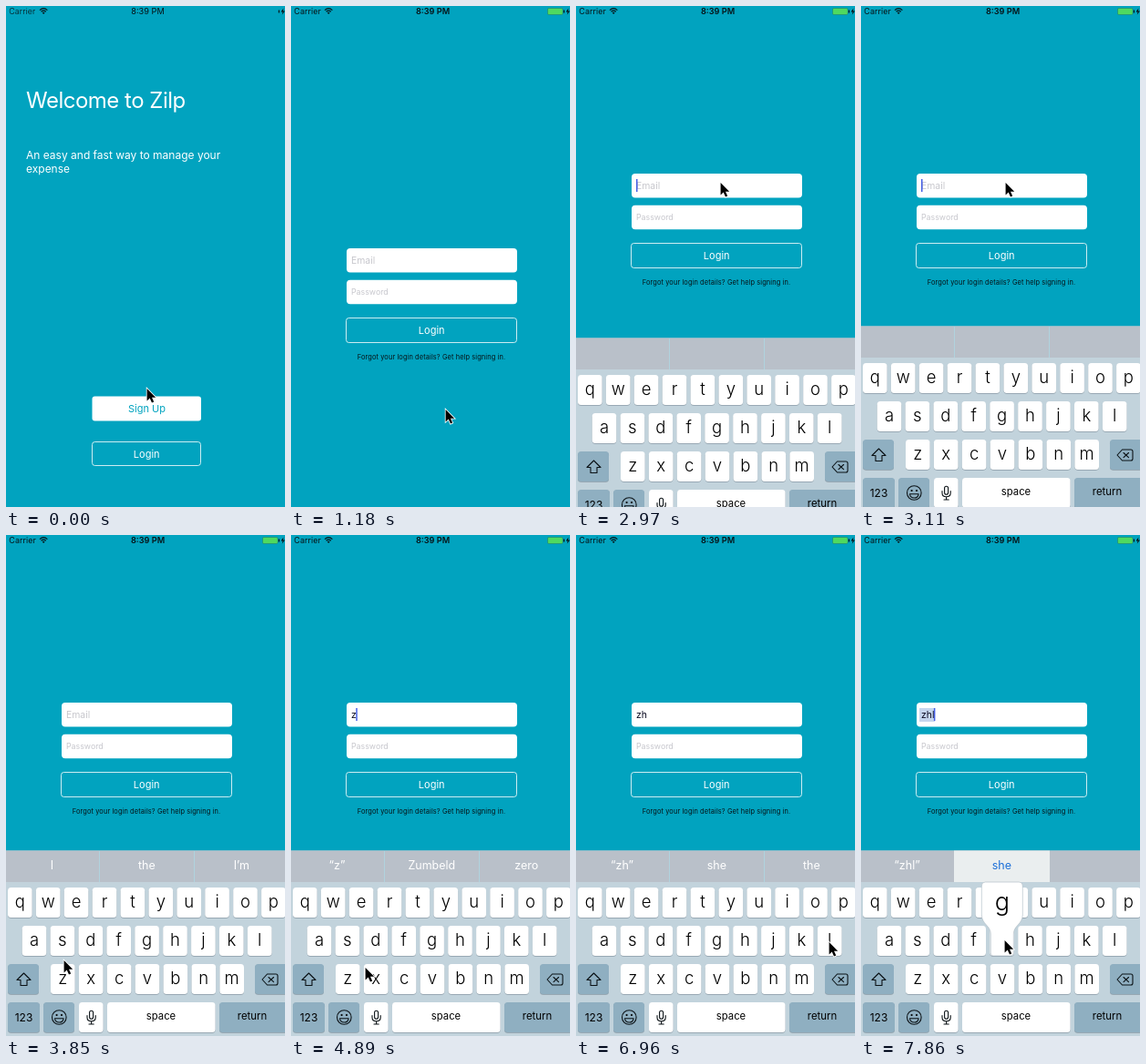
An HTML page for the animation above (8 s loop, 306 px wide and 550 px high).

```html
<!DOCTYPE html>
<html lang="en">
<head>
<meta charset="utf-8">
<title>Login flow</title>
<style>
  html, body { margin: 0; width: 100%; height: 100%; overflow: hidden; background: #01a3bf; }
  svg { display: block; font-family: Inter, "Open Sans", sans-serif; }
  text { white-space: pre; }
</style>
</head>
<body>
<svg id="stage" width="306" height="550" viewBox="0 0 306 550"></svg>
<script>
const LOOP = 8000, STEP = 148.3, LAST = 53;
const TEAL = '#01a3bf', INK = '#071418', PALE = '#c7c7cd';

const rect = (x, y, w, h, fill, more = '') =>
  `<rect x="${x}" y="${y}" width="${w}" height="${h}" fill="${fill}" ${more}/>`;
const text = (x, y, size, str, fill = '#fff', more = '') =>
  `<text x="${x}" y="${y}" font-size="${size}" fill="${fill}" ${more}>${str}</text>`;
const mid = (x, y, size, str, fill, more = '') =>
  text(x, y, size, str, fill, 'text-anchor="middle" ' + more);
const path = (d, more = '') => `<path d="${d}" ${more}/>`;
const group = (id, body) => `<g id="${id}">${body}</g>`;
const outline = (x, y, w, h) =>
  rect(x, y, w, h, 'none', 'rx="3" stroke="#fff" stroke-opacity=".8"');

// Keyboard geometry
const PITCH = 30.9, KEY_W = 26.6, KEY_H = 33;
const ROWS = [['qwertyuiop', 2, 387], ['asdfghjkl', 17.7, 429], ['zxcvbnm', 49, 471]];
const keys = {};
for (const [letters, x, y] of ROWS)
  [...letters].forEach((c, i) => keys[c] = { x: x + i * PITCH, y });

const keyCap = (x, y, w, fill = '#fff') =>
  rect(x, y + .8, w, KEY_H, '#8b9ba6', 'rx="3.5"') + rect(x, y, w, KEY_H, fill, 'rx="3.5"');
const letterKey = ([c, k]) =>
  keyCap(k.x, k.y, KEY_W) + mid(k.x + KEY_W / 2, k.y + 21.5, 18.5, c, '#000', 'font-weight="300"');

function keyboard() {
  const line = 'fill="none" stroke="#0b1216" stroke-width="1.1" stroke-linejoin="round" stroke-linecap="round"';
  const dark = '#8fafc1';
  return rect(0, 346.5, 306, 240, '#c2d3dc') + rect(0, 346.5, 306, 34.5, '#b9c0c9') +
    rect(102, 347, 1, 34, '#b0d3de') + rect(206, 347, 1, 34, '#b0d3de') +
    group('hints', '') +
    Object.entries(keys).map(letterKey).join('') +
    keyCap(2, 471, 34, dark) + keyCap(273, 471, 36, dark) +
    keyCap(2, 513, 35, dark) + keyCap(41, 513, 34, dark) +
    keyCap(80, 513, 26.6) + keyCap(111, 513, 118.6) + keyCap(234, 513, 75, dark) +
    path('M19.5 481L27 488.5H23V494.5H16V488.5H12Z', line) +
    path('M286.5 482H296Q298 482 298 484V492Q298 494 296 494H286.5L281 488ZM288 485.5L293.5 490.7M293.5 485.5L288 490.7', line) +
    mid(19.5, 533.5, 12, '123', '#000') +
    `<circle cx="58.3" cy="529.5" r="7.8" ${line}/>` +
    path('M53.5 530.8H63.1Q62.5 535 58.3 535Q54 535 53.5 530.8Z', line) +
    '<circle cx="55.6" cy="527" r="1.1"/><circle cx="61" cy="527" r="1.1"/>' +
    `<rect x="91.6" y="522.3" width="4" height="9" rx="2" ${line}/>` +
    path('M89 527.5V529.5Q89 533.8 93.6 533.8Q98.2 533.8 98.2 529.5V527.5M93.6 534V537M91 537H96.2', line) +
    mid(170, 532, 11.3, 'space', '#000') + mid(270, 532, 11.4, 'return', '#000');
}

const welcome =
  text(22, 112, 24, 'Welcome to Zilp', '#fff', 'letter-spacing="-.5"') +
  text(22, 168, 12, 'An easy and fast way to manage your') +
  text(22, 183, 12, 'expense') +
  rect(94.5, 428.5, 119.5, 27, '#fff', 'rx="3"') + mid(154.5, 446, 11, 'Sign Up', TEAL) +
  outline(94.5, 478.5, 119, 26) + mid(154.2, 495.5, 11, 'Login', '#fff', 'id="enter"');

const login =
  rect(0, 0, 306, 550, TEAL) +
  rect(61, 184, 187, 26.5, '#fff', 'rx="4"') + rect(61, 218.8, 187, 26.5, '#fff', 'rx="4"') +
  rect(64, 190, 17, 15, '#c6d6ee', 'id="mark"') +
  text(66, 201, 10.4, 'Email', PALE, 'id="hold"') +
  text(66, 201, 10.4, '', '#0a0a20', 'id="typed"') +
  rect(66, 190, 1.5, 14, '#4660e6', 'id="caret"') +
  text(66, 234.5, 8.8, 'Password', PALE) +
  outline(60.5, 260.5, 187, 27) + mid(154.2, 278, 11, 'Login') +
  mid(154, 305.7, 7.4, 'Forgot your login details? Get help signing in.', INK, 'letter-spacing=".11"') +
  mid(154, 521.3, 7.5, "Don't have an account? Sign up", INK);

const status =
  text(3.3, 9.2, 8.9, 'Carrier', INK, 'id="carrier" letter-spacing=".1"') +
  path('M37 4.6Q41.2 .8 45.4 4.6M38.6 6.2Q41.2 3.9 43.8 6.2', `fill="none" stroke="${INK}" stroke-width="1.2"`) +
  path('M41.2 9L39.7 7.3Q41.2 6 42.7 7.3Z', `fill="${INK}"`) +
  mid(155.5, 9.2, 9.2, '8:39 PM', INK, 'id="clock"') +
  group('battery', rect(281.5, 2.5, 16.5, 7, '#4fd95f', 'rx="1.3" stroke="#1d5c50" stroke-width=".6" stroke-opacity=".6"')) +
  rect(298.8, 4.5, 1.2, 3, INK) +
  path('M304.4 2.5L301.5 6.4H303.5L302.8 9.6L306 5.4H304Z', `fill="${INK}"`);

// Pressed key balloon, drawn around a key whose top left corner is 0,0
const balloon = path(
  'M-5 -48H32Q36 -48 36 -44V-12C36 -2 26 0 26 9V30Q26 33 23 33H4Q1 33 1 30V9C1 0 -9 -2 -9 -12V-44Q-9 -48 -5 -48Z',
  'fill="#fff" stroke="#a9b8c2" stroke-width=".6"') +
  mid(13.5, -17, 27, '', '#000', 'id="big" font-weight="300"');

const arrow = path('M.6 1V14.4L3.7 11.6L6 16.6L8.2 15.6L6 10.7H10.2Z',
  'stroke="#fff" stroke-width="1.6" paint-order="stroke"');

document.getElementById('stage').innerHTML =
  group('welcome', welcome) + group('login', login) + group('status', status) +
  group('board', keyboard()) + group('balloon', balloon) + group('cursor', arrow);

// Cursor path: step, x, y
const TRACK = [
  [0, 154, 419], [1, 155, 441], [2, 158, 466], [3, 161, 483], [4, 162, 487], [6, 162, 487],
  [7, 166, 468], [8, 169, 442], [9, 170, 418], [10, 168, 355], [11, 163, 268], [12, 159, 207],
  [13, 158, 193], [21, 158, 193], [22, 146, 240], [24, 85, 410], [25, 68, 456], [26, 63, 466],
  [27, 61, 480], [31, 61, 482], [35, 100, 466], [39, 172, 447], [41, 182, 443], [43, 182, 444],
  [47, 277, 446], [49, 277, 446], [51, 206, 446], [52, 166, 445], [53, 157, 444]
];
const SLIDE = { 7: 300, 8: 82, 9: 14, 10: 2 };
const RISE = { 20: 18, 21: 5 };
const PRESSED = { 29: 'z', 30: 'z', 42: 'h', 48: 'l', 53: 'g' };
const CARET_OFF = [[24, 26], [35, 37], [46, 47]];
const HINTS = [
  [22, 'I', 'the', 'I\u2019m'], [31, '\u201cz\u201d', 'Zumbeld', 'zero'],
  [43, '\u201czh\u201d', 'she', 'the'], [49, '\u201czhl\u201d', 'she', '']
];

const $ = id => document.getElementById(id);
const show = (id, on) => $(id).style.display = on ? '' : 'none';
const move = (id, x, y) => $(id).setAttribute('transform', `translate(${x} ${y})`);

function cursorAt(n) {
  const i = Math.max(1, TRACK.findIndex(p => p[0] >= n));
  const [a, b] = [TRACK[i - 1], TRACK[i]];
  const k = (n - a[0]) / (b[0] - a[0]);
  return [a[1] + (b[1] - a[1]) * k, a[2] + (b[2] - a[2]) * k].map(Math.round);
}

function drawHints(n) {
  const row = HINTS.filter(h => h[0] <= n).pop();
  const fixed = n >= 49;
  $('hints').innerHTML = !row ? '' :
    (fixed ? rect(102, 346.5, 105, 34.5, '#eaeeef') : '') +
    [50.5, 154.3, 258.3].map((x, i) =>
      mid(x, 367, 12.5, row[i + 1], fixed && i === 1 ? '#1c6fd8' : '#fff')).join('');
}

function draw(n) {
  show('welcome', n < 11);
  $('enter').setAttribute('opacity', n === 6 ? .35 : 1);
  show('login', n >= 7);
  move('login', 0, SLIDE[n] || 0);
  $('carrier').setAttribute('font-weight', n < 7 ? 300 : 400);
  $('clock').setAttribute('font-weight', n < 1 ? 400 : 600);
  show('battery', n >= 7);

  show('board', n >= 20);
  move('board', 0, RISE[n] || 0);
  drawHints(n);

  const typed = n >= 49 ? 'zhl' : n >= 43 ? 'zh' : n >= 31 ? 'z' : '';
  $('typed').textContent = typed;
  show('hold', !typed);
  show('mark', n >= 49);
  show('caret', n >= 20 && !CARET_OFF.some(([a, b]) => n >= a && n <= b));
  $('caret').setAttribute('x', 66 + (typed ? $('typed').getComputedTextLength() - .5 : 0));

  const key = PRESSED[n];
  show('balloon', key);
  if (key) {
    move('balloon', keys[key].x, keys[key].y);
    $('big').textContent = key;
  }
  move('cursor', ...cursorAt(n));
}

const start = performance.now();
let shown = -1;
function tick() {
  const t = (performance.now() - start) % LOOP;
  const n = Math.min(LAST, Math.floor((t + 12) / STEP));
  if (n !== shown) draw(shown = n);
  requestAnimationFrame(tick);
}
tick();
</script>
</body>
</html>
```
